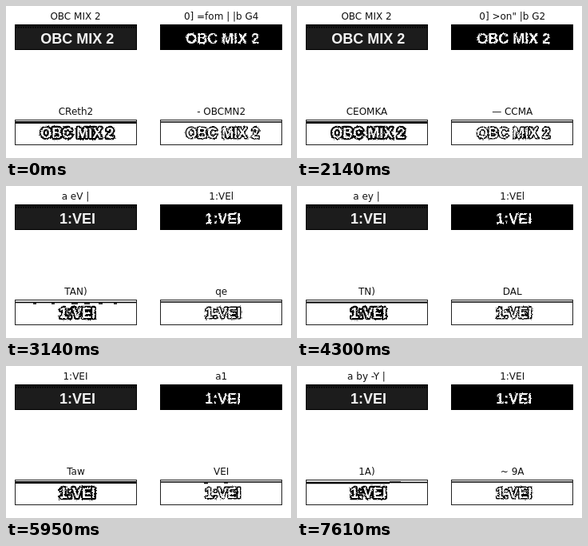
An HTML page that plays this animation: 357 px wide and 190 px high, repeating every 8 s.

```html
<!DOCTYPE html>
<html lang="en">
<head>
<meta charset="utf-8">
<title>Label recognition</title>
<style>
  html, body { margin: 0; width: 100%; height: 100%; overflow: hidden; background: #fff; }
  svg { display: block; width: 100%; height: 100%; }
  text { text-anchor: middle; white-space: pre; }
  .title { font: 12px "DejaVu Sans", sans-serif; fill: #111; }
  .label { font: bold 18px "Liberation Sans", Arial, sans-serif; fill: #fff; }
  .outline { stroke: #000; stroke-linejoin: round; paint-order: stroke; }
  .frame { fill: none; stroke: #000; }
</style>
</head>
<body>
<svg viewBox="0 0 357 190">
  <defs>
    <filter id="soft" x="-5%" y="-20%" width="110%" height="140%" color-interpolation-filters="sRGB">
      <feTurbulence type="fractalNoise" baseFrequency=".3" numOctaves="2"/>
      <feDisplacementMap in="SourceGraphic" scale="1" xChannelSelector="R" yChannelSelector="G"/>
    </filter>
    <filter id="rough" x="-5%" y="-20%" width="110%" height="140%" color-interpolation-filters="sRGB">
      <feTurbulence type="fractalNoise" baseFrequency=".4" numOctaves="2"/>
      <feDisplacementMap in="SourceGraphic" scale="3" xChannelSelector="R" yChannelSelector="G"/>
    </filter>
  </defs>

  <rect x="11" y="23" width="153" height="32" fill="#1c1c1c"/>
  <rect x="11" y="23" width="153" height="3" fill="#101010"/>
  <path d="M12 26.8H163" stroke="#050505" stroke-width="1.4" stroke-dasharray="2 1"/>
  <rect x="193" y="23" width="153" height="32"/>
  <path id="barA" d="M11 145.5H164" stroke="#000"/>
  <path id="barB" d="M193 145H346" stroke="#000"/>
  <path id="extra" fill="none" stroke="#000" stroke-width="1.5"/>
  <g class="frame">
    <rect x="11.5" y="23.5" width="152" height="31"/>
    <rect x="193.5" y="23.5" width="152" height="31"/>
    <rect x="11.5" y="142.5" width="152" height="31" stroke="#222"/>
    <rect x="193.5" y="142.5" width="152" height="31" stroke="#222"/>
  </g>

  <text class="title" x="87" y="17"></text>
  <text class="title" x="269.7" y="17"></text>
  <text class="title" x="87.5" y="136"></text>
  <text class="title" x="269.7" y="136"></text>

  <g filter="url(#soft)"><text class="label" y="46.5" fill-opacity=".94"></text></g>
  <g filter="url(#rough)"><text class="label" y="46.5"></text></g>
  <g filter="url(#rough)"><text class="label outline" y="165" stroke-width="4.4"></text></g>
  <g filter="url(#rough)"><text class="label outline" y="165" stroke-width="2.8"></text></g>
</svg>
<script>
const LOOP = 8000;
const MIX = "OBC MIX 2", VEI = "1:VEI";
const EDGE = "M275 172.5H346";
const DASHES = "M34 147H38M57 147H61M82 147H90M98 147H105M116 147H121M135 147H139";
const BUMPS = "M248 146.5H253M273 146H278";
const STEP = "M11 146.5H116M116 145H130";

// start, label, four titles, bar widths, extra marks
const states = [
  [0,    MIX, [MIX, "0] =fom | |b G4", "CReth2", "- OBCMN2"], 2.8, 1.6, ""],
  [320,  MIX, [MIX, "0] em) |b az", "CReth2", "OBCINIXOME"], 2.8, 1.4, ""],
  [980,  MIX, [MIX, "0] em) |b az", "CECik2", "OBCINIXOME"], 2.6, 1.2, EDGE],
  [1480, MIX, [MIX, "0] >on\" |b G2", "CECik2", "OBCINIXOME"], 2.8, 1.2, EDGE],
  [2140, MIX, [MIX, "0] >on\" |b G2", "CEOMKA", "— CCMA"], 2.8, 1.6, ""],
  [2640, MIX, [MIX, "0] =fom | |b G4", "CEOMKA", "— CCMA"], 2.8, 1.4, ""],
  [3140, VEI, ["a eV |", "1:VEl", "TAN)", "qe"], 1.6, 1.4, DASHES],
  [3800, VEI, ["a ey |", "1:VEl", "TAN)", "DAL"], 2, 1.4, ""],
  [4300, VEI, ["a ey |", "1:VEl", "TN)", "DAL"], 2.2, 1.4, ""],
  [4800, VEI, ["a eV |", "1:VEl", "TN)", "DAL"], 2.2, 1.5, ""],
  [4960, VEI, ["a ey |", "1:VEl", "TN)", "qe"], 2.4, 1.4, ""],
  [5450, VEI, [VEI, "1:VEl", "Taw", "VEI"], 2.6, 1.6, ""],
  [5950, VEI, [VEI, "a1", "Taw", "VEI"], 2.8, 1.6, BUMPS],
  [6450, VEI, [VEI, VEI, "Taw", "VEI"], 2.6, 1.6, ""],
  [7110, VEI, ["a by -Y |", VEI, "Taw", "~ 9A"], 2.4, 1.5, ""],
  [7610, VEI, ["a by -Y |", VEI, "1A)", "~ 9A"], 1.4, 1.4, STEP]
];

const $ = id => document.getElementById(id);
const titles = document.querySelectorAll(".title");
const labels = document.querySelectorAll(".label");
const noises = document.querySelectorAll("feTurbulence");
let shown = -1;

function show(n) {
  const [, label, names, barA, barB, extra] = states[n];
  titles.forEach((el, i) => el.textContent = names[i]);
  labels.forEach((el, i) => {
    el.textContent = label;
    el.setAttribute("x", (i % 2 ? 271.3 : 89.2) + (label === VEI ? .4 : 0));
  });
  noises.forEach((el, i) => el.setAttribute("seed", n * 3 + i + 1));
  $("barA").setAttribute("stroke-width", barA);
  $("barB").setAttribute("stroke-width", barB);
  $("extra").setAttribute("d", extra);
}

function tick(now) {
  const t = now % LOOP;
  let n = states.length - 1;
  while (states[n][0] > t) n--;
  if (n !== shown) show(shown = n);
  requestAnimationFrame(tick);
}
show(shown = 0);
requestAnimationFrame(tick);
</script>
</body>
</html>
```
